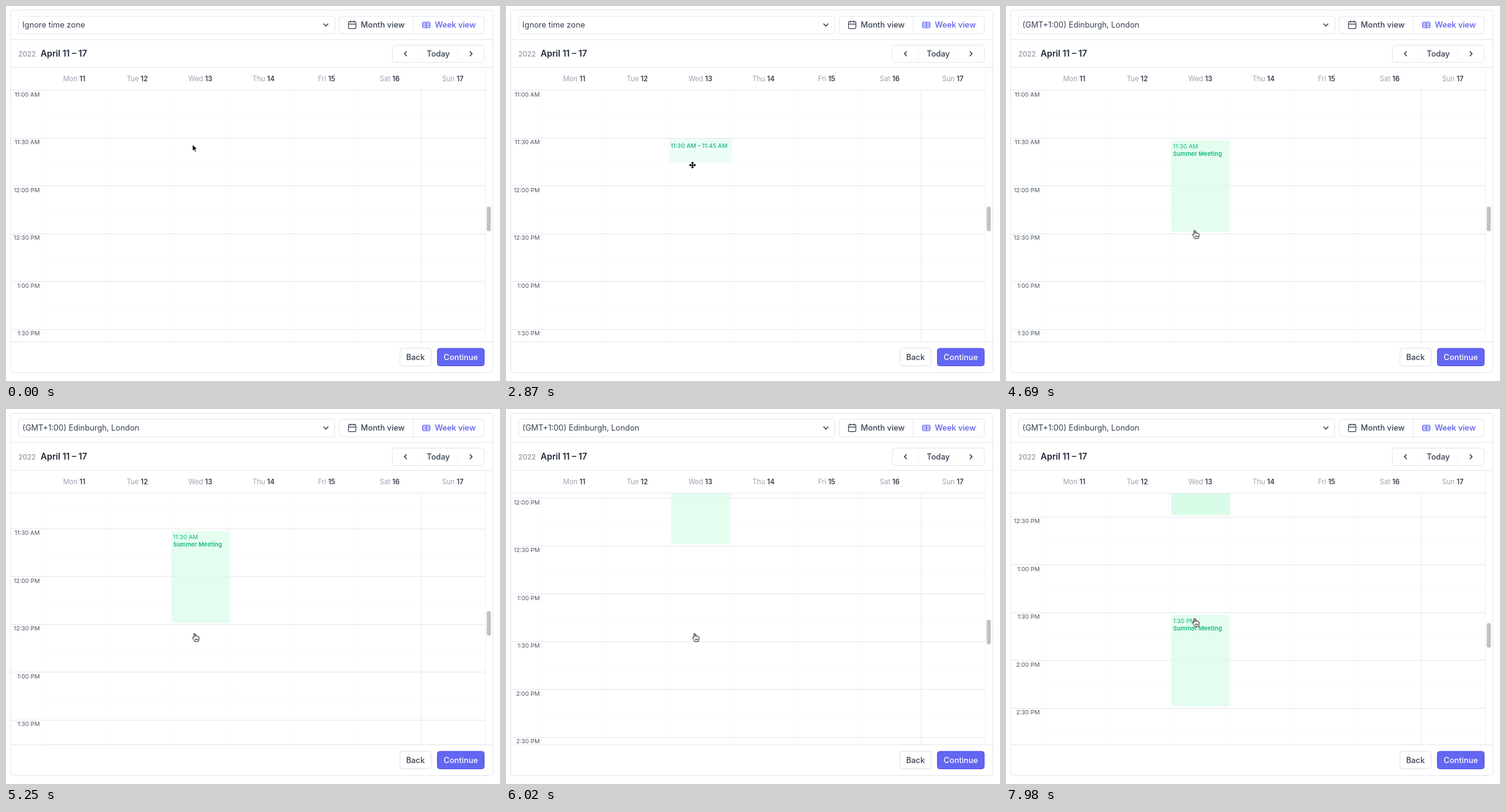
An HTML page for the animation above (8 s loop, 800 by 608 pixels).

```html
<!DOCTYPE html>
<html lang="en">
<head>
<meta charset="utf-8">
<title>Week planner</title>
<style>
  html, body { margin: 0; width: 100%; height: 100%; overflow: hidden; background: #fff; }
  svg { display: block; width: 800px; height: 608px; font-family: Inter, sans-serif; }
  .box { fill: #fff; stroke: #e3e6ea; }
  .line { stroke: #e5e7eb; fill: none; }
  .faint { stroke: #f9fafb; fill: none; }
  .ui { font-size: 12.8px; fill: #374151; }
  .mid { text-anchor: middle; }
  .m { font-weight: 500; }
  .b { font-weight: 600; }
  .day { font-size: 11.2px; fill: #9ca3af; text-anchor: middle; }
  .day tspan { fill: #374151; font-weight: 600; }
  .hour { font-size: 9.6px; fill: #4b5563; text-anchor: end; }
  .event { font-size: 9.6px; fill: #10b981; }
  .icon { fill: none; stroke: #374151; stroke-width: 1.6; stroke-linecap: round; stroke-linejoin: round; }
</style>
</head>
<body>
<svg viewBox="0 0 800 608">
  <defs>
    <clipPath id="view"><rect x="8" y="137" width="768" height="407"/></clipPath>
  </defs>
  <rect class="box" x="7.5" y="6.5" width="781" height="588" rx="5"/>
  <path class="line" d="M8 54.5H788M8 99.5H788M8 544.5H788"/>

  <g clip-path="url(#view)">
    <g id="cols"></g>
    <g id="grid">
      <g id="rows"></g>
      <g id="slot">
        <rect x="264" y="215" width="102.5" fill="#ecfdf5" fill-opacity=".96"/>
        <text class="event m" x="266.5" y="229.6"></text>
      </g>
      <g id="events"></g>
    </g>
  </g>
  <path class="line" d="M8 136.5H776"/>
  <path d="M776.5 100V544" stroke="#eff1f3"/>
  <g id="days"></g>
  <rect id="thumb" x="778.5" width="6.6" height="40" rx="3.3" fill="#c1c1c1"/>

  <rect class="box" x="20.5" y="16.5" width="512" height="28.5" rx="4"/>
  <text class="ui" id="zone" x="26.6" y="35.2"></text>
  <path class="icon" d="M514.5 29l3.5 3.5 3.5-3.5"/>

  <rect class="box" x="539.5" y="16.5" width="235" height="28.5" rx="4"/>
  <path class="line" d="M659.5 17V45"/>
  <g class="icon" style="stroke-width:1.2">
    <rect x="554.6" y="25.4" width="12" height="11.2" rx="1.6"/>
    <path d="M557.6 24v2.6M563.6 24v2.6M554.6 29.4h12"/>
    <g style="stroke:#6366f1">
      <rect x="674.6" y="26.3" width="12" height="8.8" rx="1.3"/>
      <path d="M674.6 29.2h12M674.6 32.2h12M680.6 26.6v8.4"/>
    </g>
  </g>
  <text class="ui m" x="574.5" y="35.2">Month view</text>
  <text class="ui m" x="694.5" y="35.2" style="fill:#5b5bea">Week view</text>

  <text class="b" x="20" y="82" font-size="11.2" fill="#9ca3af">2022</text>
  <text class="b" x="56" y="82.2" font-size="14" fill="#1f2937">April 11 – 17</text>
  <rect class="box" x="625.5" y="63.5" width="149" height="28" rx="4"/>
  <path d="M668.5 64V91M731.5 64V91" stroke="#f6f7f8"/>
  <path class="icon" d="M648.5 74l-3.2 3.4 3.2 3.4M751.5 74l3.2 3.4-3.2 3.4"/>
  <text class="ui m mid" x="700" y="82">Today</text>

  <rect class="box" x="638" y="555" width="50.5" height="28.5" rx="4" style="stroke:#dde0e5"/>
  <text class="ui m mid" x="663" y="573.6">Back</text>
  <rect x="698.5" y="555" width="76" height="28.5" rx="4" fill="#6366f1" stroke="#5451e6"/>
  <text class="ui m mid" x="736.5" y="573.6" style="fill:#fff">Continue</text>

  <g id="cursor">
    <path id="arrow" d="M0 0V10.6L2.4 8.4L4.1 12.2L5.9 11.4L4.2 7.7H7.6Z"
      fill="#000" stroke="#fff" stroke-width=".9" stroke-linejoin="round"/>
    <g id="move">
      <path d="M0-5.8L2.6-2.8H.8V-.8H2.8V-2.6L5.8 0L2.8 2.6V.8H.8V2.8H2.6L0 5.8L-2.6 2.8H-.8V.8H-2.8V2.6L-5.8 0L-2.8-2.6V-.8H-.8V-2.8H-2.6Z"
        fill="#000" stroke="#fff" stroke-width="1.4" paint-order="stroke" stroke-linejoin="round"/>
    </g>
    <path id="hand" d="M-1.3 6.6V.3C-1.3-1.1.8-1.1.8.3V4.3C1-.1 3 .3 3 4.5C3.3 3.2 5.1 3.4 5.1 4.9C5.5 4 7.2 4.2 7.2 5.6V8.2C7.2 10 6.1 10.8 6.1 12.6H-.1C-.2 10.9-1.6 10-2.6 8.3C-3.2 7.2-4.1 6.6-3.3 5.8C-2.6 5.2-1.8 5.9-1.3 6.6ZM1.2 7.8V10.3M3 7.8V10.3M4.8 7.8V10.3"
      fill="#fff" stroke="#111" stroke-width=".95" stroke-linejoin="round"/>
  </g>
</svg>
<script>
const $ = id => document.getElementById(id);
const LOOP = 8000, STEP = 70;
const TOP = 136.75, HALF = 77.5, QUARTER = HALF / 2, START = TOP + HALF;
const DROP = 4200, ZONE = 4620, LEAVE = 6440, PRESS = 1050, CLICK = 7350;

const scrollKeys = [[5110, 0], [5180, 8], [5250, 20], [5600, 81], [5950, 138], [6300, 184], [6440, 194]];
const xKeys = [[420, 302], [2870, 302], [3780, 305.5], [6440, 305.5], [6650, 306.6], [6930, 305.6]];
const yKeys = [[70, 224.5], [280, 223.5], [420, 223.5], [560, 222.5], [1050, 222.5], [2380, 232],
  [2870, 258], [3500, 348], [3780, 364.5], [6440, 364.5], [6650, 337], [6930, 340.3]];

function at(keys, t) {
  if (t <= keys[0][0]) return keys[0][1];
  for (let i = 1; i < keys.length; i++) {
    const [t0, a] = keys[i - 1], [t1, b] = keys[i];
    if (t <= t1) return a + (b - a) * (t - t0) / (t1 - t0);
  }
  return keys[keys.length - 1][1];
}

// Minutes after midnight as a 12-hour clock
function clock(min) {
  const h = Math.floor(min / 60);
  return `${(h + 11) % 12 + 1}:${String(min % 60).padStart(2, "0")} ${h < 12 ? "AM" : "PM"}`;
}

function build() {
  let cols = "", days = "", rows = "";
  ["Mon", "Tue", "Wed", "Thu", "Fri", "Sat", "Sun"].forEach((name, i) => {
    const x = Math.floor(59 + 102.4 * i) - .5;
    cols += `<path class="${i === 6 ? "line" : "faint"}" d="M${x} 137V544"/>`;
    days += `<text class="day" x="${110.4 + 102.2 * i}" y="122.4">${name} <tspan>${11 + i}</tspan></text>`;
  });
  for (let i = 0; i < 9; i++) {
    const y = TOP + HALF * i;
    rows += `<path class="line" d="M8 ${Math.floor(y) + .5}H776"/>
      <path class="faint" d="M59 ${Math.floor(y + QUARTER) + .5}H776"/>
      <text class="hour" x="54.6" y="${y + 9.8}">${clock(660 + 30 * i)}</text>`;
  }
  $("cols").innerHTML = cols;
  $("days").innerHTML = days;
  $("rows").innerHTML = rows;
  $("events").innerHTML = [690, 810].map(min => {
    const y = TOP + (min - 660) / 30 * HALF;
    return `<g><rect x="267.5" y="${y + 3.5}" width="95.5" height="148.5" rx="4" fill="#d9fce8"/>
      <text class="event" x="270.4" y="${y + 16.6}">${clock(min)}</text>
      <text class="event b" x="270.4" y="${y + 29.2}">Summer Meeting</text></g>`;
  }).join("");
}

const show = (el, on) => el.setAttribute("visibility", on ? "visible" : "hidden");

function draw(t) {
  const scroll = Math.round(at(scrollKeys, t));
  const x = at(xKeys, t), y = at(yKeys, t);
  $("grid").setAttribute("transform", `translate(0 ${-scroll})`);
  $("thumb").setAttribute("y", 325.2 + scroll * .113);
  $("zone").textContent = t < ZONE ? "Ignore time zone" : "(GMT+1:00) Edinburgh, London";

  const dragging = t >= PRESS && t < DROP;
  const quarters = Math.max(1, Math.round((y - START) / QUARTER));
  const [area, label] = $("slot").children;
  show($("slot"), dragging);
  area.setAttribute("height", quarters * QUARTER);
  label.textContent = `${clock(690)} – ${clock(690 + 15 * quarters)}`;

  const [first, second] = $("events").children;
  show(first, t >= DROP);
  show(second, t >= CLICK);
  first.firstChild.setAttribute("opacity", t < LEAVE ? .7 : 1);
  second.firstChild.setAttribute("opacity", .7);
  second.setAttribute("opacity", Math.min(1, Math.max(0, (t - CLICK + STEP) / 210)));

  const hand = t >= DROP && t < LEAVE || t >= CLICK;
  show($("move"), dragging);
  show($("hand"), hand);
  show($("arrow"), !dragging && !hand);
  $("cursor").setAttribute("transform", `translate(${x} ${y})`);
}

build();
draw(0);
const begin = performance.now();
function tick() {
  const t = (performance.now() - begin) % LOOP;
  draw(Math.floor(t / STEP) * STEP);
  requestAnimationFrame(tick);
}
requestAnimationFrame(tick);
</script>
</body>
</html>
```
